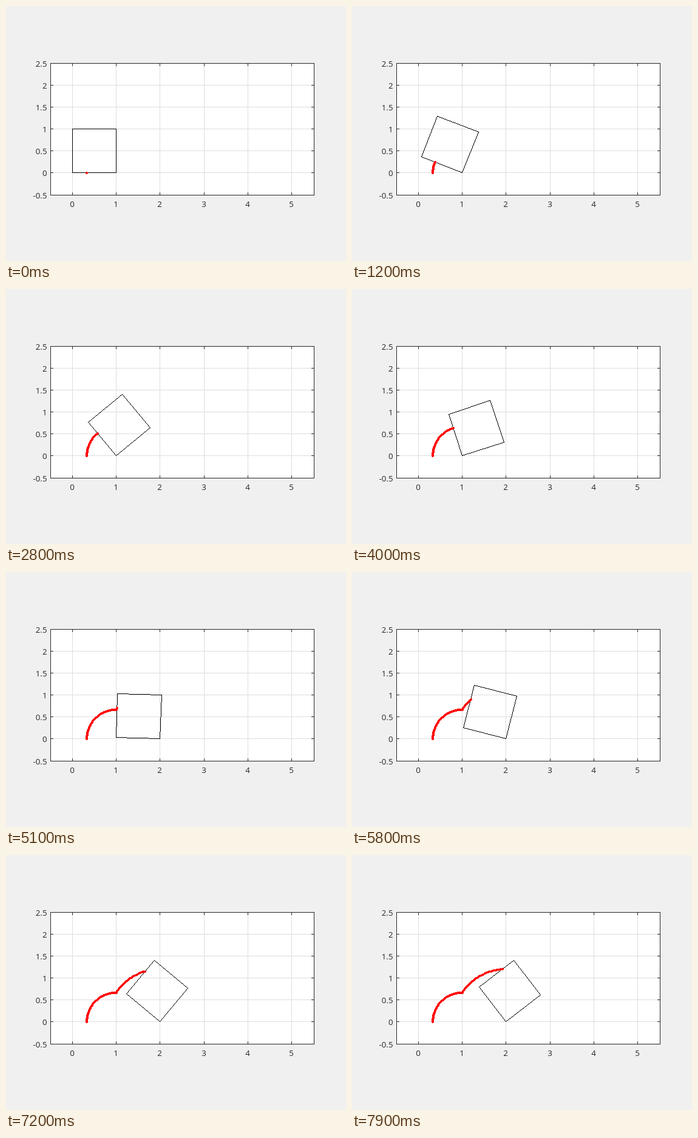
These frames come from a looping animation (560x420 px, 8 s). An HTML page with a canvas:

```html
<!DOCTYPE html>
<html lang="en">
<head>
<meta charset="utf-8">
<title>Rolling square</title>
<style>
  html, body { margin: 0; width: 100%; height: 100%; overflow: hidden; background: #f0f0f0; }
  canvas { display: block; }
</style>
</head>
<body>
<canvas id="stage" width="560" height="420"></canvas>
<script>
const ctx = document.getElementById('stage').getContext('2d');
const UNIT = 434 / 6;
const LEFT = 73, RIGHT = 507, TOP = 94, BOTTOM = 311;
const STEP_MS = 100, STEPS = 80, STEPS_PER_ROLL = 50;
const INK = '#262626';

const toX = x => 109.17 + x * UNIT;
const toY = y => 274.9 - y * UNIT;

function rect(x, y, w, h, color) {
  ctx.fillStyle = color;
  ctx.fillRect(x, y, w, h);
}

// Crisp one-pixel line without smoothing
function line([ax, ay], [bx, by]) {
  const x0 = Math.floor(toX(ax)), y0 = Math.floor(toY(ay));
  const dx = Math.floor(toX(bx)) - x0, dy = Math.floor(toY(by)) - y0;
  const n = Math.max(Math.abs(dx), Math.abs(dy));
  for (let i = 0; i <= n; i++) {
    rect(Math.round(x0 + dx * i / n), Math.round(y0 + dy * i / n), 1, 1, '#000');
  }
}

function dot([px, py]) {
  const x = Math.round(toX(px) - 2), y = Math.round(toY(py) - 2);
  rect(x + 1, y, 2, 4, '#f00');
  rect(x, y + 1, 4, 2, '#f00');
}

function drawAxes() {
  const width = RIGHT - LEFT, height = BOTTOM - TOP;
  const xs = [0, 1, 2, 3, 4, 5], ys = [-0.5, 0, 0.5, 1, 1.5, 2, 2.5];
  const px = x => Math.floor(toX(x)), py = y => Math.floor(toY(y));

  rect(0, 0, 560, 420, '#f0f0f0');
  rect(LEFT, TOP, width + 1, height + 1, '#fff');
  for (const x of xs) rect(px(x), TOP, 1, height, '#dedede');
  for (const y of ys) rect(LEFT, py(y), width, 1, '#dedede');

  ctx.font = '13.33px "Open Sans", "Noto Sans", sans-serif';
  ctx.textAlign = 'center';
  for (const x of xs) {
    rect(px(x), TOP, 1, 5, INK);
    rect(px(x), BOTTOM - 4, 1, 5, INK);
    ctx.fillText(x, px(x), 331);
  }
  ctx.textAlign = 'right';
  for (const y of ys) {
    rect(LEFT, py(y), 5, 1, INK);
    rect(RIGHT - 4, py(y), 5, 1, INK);
    ctx.fillText(y, 67.5, py(y) + 6);
  }
  rect(LEFT, TOP, width + 1, 1, INK);
  rect(LEFT, BOTTOM, width + 1, 1, INK);
  rect(LEFT, TOP, 1, height + 1, INK);
  rect(RIGHT, TOP, 1, height + 1, INK);
}

// Square rolled about its lower right corner; maps a point of the unrolled cell
function pose(step) {
  const roll = Math.floor(step / STEPS_PER_ROLL);
  const angle = (step % STEPS_PER_ROLL) / STEPS_PER_ROLL * Math.PI / 2;
  const c = Math.cos(angle), s = Math.sin(angle);
  return {
    roll,
    place: (x, y) => [roll + 1 + (x - 1) * c + y * s, (1 - x) * s + y * c]
  };
}

function tracked(step) {
  const { roll, place } = pose(step);
  return roll === 0 ? place(1 / 3, 0) : place(0, 2 / 3);
}

function draw(step) {
  drawAxes();
  const { place } = pose(step);
  const corners = [place(0, 0), place(1, 0), place(1, 1), place(0, 1)];
  corners.forEach((p, i) => line(p, corners[(i + 1) % 4]));
  for (let i = 0; i <= step; i++) dot(tracked(i));
}

const start = performance.now();
let shown = -1;
function tick() {
  const step = Math.floor((performance.now() - start) / STEP_MS) % STEPS;
  if (step !== shown) draw(shown = step);
  requestAnimationFrame(tick);
}
tick();
</script>
</body>
</html>
```
